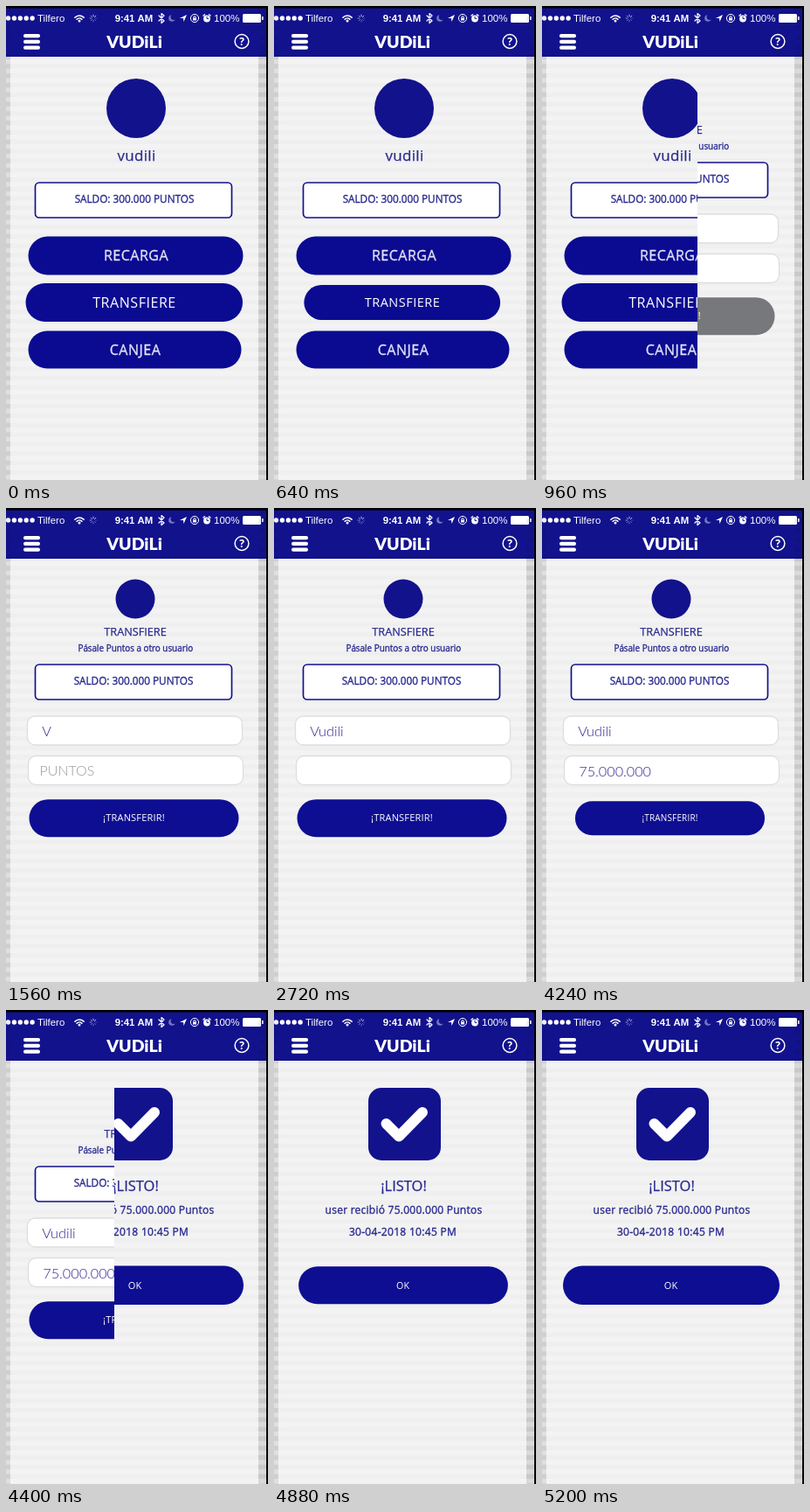
An HTML page with a canvas for the animation above (5.36 s loop, 300x542 px).

```html
<!DOCTYPE html>
<html lang="es">
<head>
<meta charset="utf-8">
<title>Transferir puntos</title>
<style>
  html, body { margin: 0; width: 100%; height: 100%; overflow: hidden; background: #f2f2f2; }
  canvas { display: block; width: 300px; height: 542px; }
</style>
</head>
<body>
<canvas id="stage"></canvas>
<script>
const W = 300, H = 542, LOOP = 5360, TICK = 40;
const NAVY = '#12128d', BUTTON = '#0b0b92', ACTION = '#0e0e93', INK = '#2a2a90', WHITE = '#fff';
const SANS = '"Open Sans", "Noto Sans", sans-serif';
const FIELD = 'Lato, sans-serif';
const STATUS = '"Liberation Sans", Arial, sans-serif';
const NAME = 'Vudili', AMOUNT = '75.000.000';
const NAME_TIMES = [1560, 1680, 1800, 1960, 2080, 2200];
const AMOUNT_CLEAR = 2720;
const AMOUNT_TIMES = [2800, 2920, 3000, 3120, 3200, 3280, 3400, 3480, 3600, 3720];

const canvas = document.getElementById('stage');
const ctx = canvas.getContext('2d');
const ratio = window.devicePixelRatio || 1;
canvas.width = W * ratio;
canvas.height = H * ratio;

function rect(x, y, w, h, fill) {
  ctx.fillStyle = fill;
  ctx.fillRect(x, y, w, h);
}

function round(x, y, w, h, r, fill, stroke, line = 1) {
  ctx.beginPath();
  ctx.roundRect(x, y, w, h, r);
  if (fill) { ctx.fillStyle = fill; ctx.fill(); }
  if (stroke) { ctx.strokeStyle = stroke; ctx.lineWidth = line; ctx.stroke(); }
}

function disc(x, y, r, fill) {
  ctx.beginPath();
  ctx.arc(x, y, r, 0, Math.PI * 2);
  ctx.fillStyle = fill;
  ctx.fill();
}

function arc(x, y, r, from = 0, to = Math.PI * 2, line = 1) {
  ctx.beginPath();
  ctx.arc(x, y, r, from, to);
  ctx.strokeStyle = WHITE;
  ctx.lineWidth = line;
  ctx.stroke();
}

function path(points, line, color = WHITE) {
  ctx.beginPath();
  points.forEach(([x, y]) => ctx.lineTo(x, y));
  ctx.strokeStyle = color;
  ctx.lineWidth = line;
  ctx.lineCap = ctx.lineJoin = 'round';
  ctx.stroke();
}

// "heavy" thickens the strokes to a weight between regular and semibold.
function text(str, x, y, size, color, { font = SANS, weight = 400, align = 'center', gap = 0, heavy = 0 } = {}) {
  ctx.font = `${weight} ${size}px ${font}`;
  ctx.letterSpacing = gap + 'px';
  ctx.textAlign = align;
  ctx.textBaseline = 'alphabetic';
  ctx.fillStyle = ctx.strokeStyle = color;
  ctx.fillText(str, x, y);
  if (heavy) {
    ctx.lineWidth = heavy;
    ctx.lineJoin = 'round';
    ctx.strokeText(str, x, y);
  }
}

// Pill button, scaled about its centre together with its label.
function button(x, y, w, h, label, { size, textX, base, scale = 1, fill = BUTTON, color = WHITE, ...style }) {
  const cx = x + w / 2, cy = y + h / 2;
  ctx.save();
  ctx.translate(cx, cy);
  ctx.scale(scale, scale);
  round(-w / 2, -h / 2, w, h, h / 2, fill);
  text(label, textX - cx, base - cy, size, color, style);
  ctx.restore();
}

// Dips by a tenth and returns over nine ticks.
function press(t, start) {
  const k = (t - start) / (9 * TICK);
  return k > 0 && k < 1 ? 1 - 0.097 * Math.sin(Math.PI * k) : 1;
}

const typed = (str, times, t) => str.slice(0, times.filter(at => t >= at).length);

function stripes(x, w, alpha) {
  for (let y = 1.4; y < H; y += 10.8) rect(x, y, w, 5.4, `rgba(0,0,0,${alpha})`);
}

function backdrop() {
  rect(0, 0, W, H, '#f3f3f3');
  rect(0, 58, 5, H, '#dfdfdf');
  rect(289, 58, 9, H, '#d9d9d9');
  stripes(0, 298, .014);
}

function statusBar() {
  for (let i = 0; i < 5; i++) disc(2.5 + i * 6.9, 14, 2.7, WHITE);
  text('Tilfero', 36, 18, 11.4, WHITE, { font: STATUS, align: 'left' });
  for (let i = 0; i < 2; i++) arc(84, 18, 4 + i * 3, -Math.PI * .76, -Math.PI * .24, 1.6);
  disc(84, 17, 1.5, WHITE);
  for (let i = 0; i < 8; i++) {
    const a = i * Math.PI / 4, c = Math.cos(a), s = Math.sin(a);
    path([[100 + c * 2, 14 + s * 2], [100 + c * 4, 14 + s * 4]], 1, `rgba(255,255,255,${.2 + i * .08})`);
  }
  text('9:41 AM', 146.5, 18, 11.4, WHITE, { font: STATUS, weight: 700 });
  path([[175, 11], [181, 17], [178, 19.5], [178, 8.5], [181, 11], [175, 17]], 1.2);
  disc(190, 14, 3.8, '#7777bf');
  disc(192, 12.6, 3.4, NAVY);
  ctx.beginPath();
  [[199, 14], [207, 10], [203.5, 18], [203, 14]].forEach(([x, y]) => ctx.lineTo(x, y));
  ctx.fillStyle = WHITE;
  ctx.fill();
  arc(216, 14, 4.6);
  rect(214, 13.5, 4, 3, WHITE);
  arc(216, 13, 1.4, Math.PI, 0, .9);
  disc(230, 14.5, 3.9, WHITE);
  path([[226, 11], [227.5, 9.8]], 1.4);
  path([[234, 11], [232.5, 9.8]], 1.4);
  path([[230, 12], [230, 14.5], [231.8, 14.5]], .9, NAVY);
  text('100%', 238, 18, 11.5, WHITE, { font: STATUS, align: 'left' });
  round(271, 9, 21, 10, 1.5, WHITE);
  rect(293, 12, 1.6, 4, WHITE);
}

function header() {
  rect(0, 0, 298, 58, NAVY);
  statusBar();
  for (const y of [32, 38.8, 45.6]) round(20, y, 19, 4.2, 2, WHITE);
  text('VUDiLi', 147, 48, 19.5, WHITE, { font: FIELD, weight: 900 });
  arc(270, 40.5, 7.9, 0, Math.PI * 2, 1.5);
  text('?', 270, 45, 12, WHITE, { weight: 700 });
}

function frameEdges() {
  stripes(0, 5, .06);
  stripes(289, 9, .06);
  rect(0, 0, W, 2.6, '#000');
  rect(298, 0, 2, H, '#000');
}

function balance(y, x) {
  round(33.5, y, 225, 40, 4.5, WHITE, NAVY, 1.7);
  text('SALDO: 300.000 PUNTOS', x, y + 22.6, 11.75, INK, { heavy: .35 });
}

function field(x, y, value, hint) {
  round(x, y, 246, 33, 9, WHITE, '#dedede', 1.3);
  const style = { font: FIELD, align: 'left', weight: 300 };
  if (value) text(value, x + 16.8, y + 23.4, 16.2, '#33258f', style);
  else if (hint) text(hint, 38.5, y + 22.5, 16, '#999', style);
}

function homeScreen(t) {
  disc(149, 117, 34, NAVY);
  text('vudili', 149.5, 177, 17, INK, { gap: .3, heavy: .25 });
  balance(202, 147);
  const label = { size: 16, gap: .5, color: '#e2e2f4', heavy: .35 };
  button(25.5, 263.5, 246, 44, 'RECARGA', { ...label, textX: 149, base: 290.5 });
  button(22.5, 317, 248.5, 44, 'TRANSFIERE', { size: 16, gap: .55, textX: 147, base: 344.5, scale: press(t, 440) });
  button(25.5, 371.5, 244, 43, 'CANJEA', { ...label, textX: 148, base: 398.5 });
}

function transferScreen(t) {
  disc(148, 104, 22.5, NAVY);
  text('TRANSFIERE', 148, 146, 12.7, INK, { heavy: .25 });
  text('Pásale Puntos a otro usuario', 148.3, 163.5, 9.9, INK, { heavy: .35 });
  balance(179, 146);
  field(24.5, 238, typed(NAME, NAME_TIMES, t), 'USUARIO');
  field(25.5, 283.5, typed(AMOUNT, AMOUNT_TIMES, t), t < AMOUNT_CLEAR ? 'PUNTOS' : '');
  button(26.5, 333.2, 240, 43, '¡TRANSFERIR!', {
    size: 11, gap: .2, textX: 146.5, base: 358.2,
    fill: t < NAME_TIMES[0] ? '#77787b' : ACTION,
    scale: press(t, 4040)
  });
}

function doneScreen(t) {
  round(108, 89, 83, 83, 15, NAVY);
  path([[128.5, 130], [143, 144.5], [170, 117]], 12);
  text('¡LISTO!', 148.5, 207, 16.5, INK, { heavy: .25 });
  text('user recibió 75.000.000 Puntos', 148.5, 233, 12, INK, { gap: .25, heavy: .35 });
  text('30-04-2018 10:45 PM', 147.5, 258, 12, INK, { gap: .3, heavy: .35 });
  button(24, 292.5, 248, 44.5, 'OK', { size: 11, textX: 147.5, base: 319, fill: ACTION, scale: press(t, 4840) });
}

function show(screen, t, left, right) {
  if (left >= right) return;
  ctx.save();
  ctx.beginPath();
  ctx.rect(left, 0, right - left, H);
  ctx.clip();
  screen(t);
  ctx.restore();
}

// Left edge of an incoming screen, sweeping from right to left.
const wipe = (t, start) => Math.max(0, Math.min(W, Math.round(W - (t - start) * 3.05)));

function draw(t) {
  ctx.setTransform(ratio, 0, 0, ratio, 0, 0);
  const transferEdge = wipe(t, 920), doneEdge = wipe(t, 4342.3);
  backdrop();
  show(homeScreen, t, 0, transferEdge);
  show(transferScreen, t, transferEdge, doneEdge);
  show(doneScreen, t, doneEdge, W);
  header();
  frameEdges();
}

const origin = performance.now();
function frame() {
  const t = (performance.now() - origin) % LOOP;
  draw(Math.floor(t / TICK) * TICK);
  requestAnimationFrame(frame);
}
frame();
</script>
</body>
</html>
```
